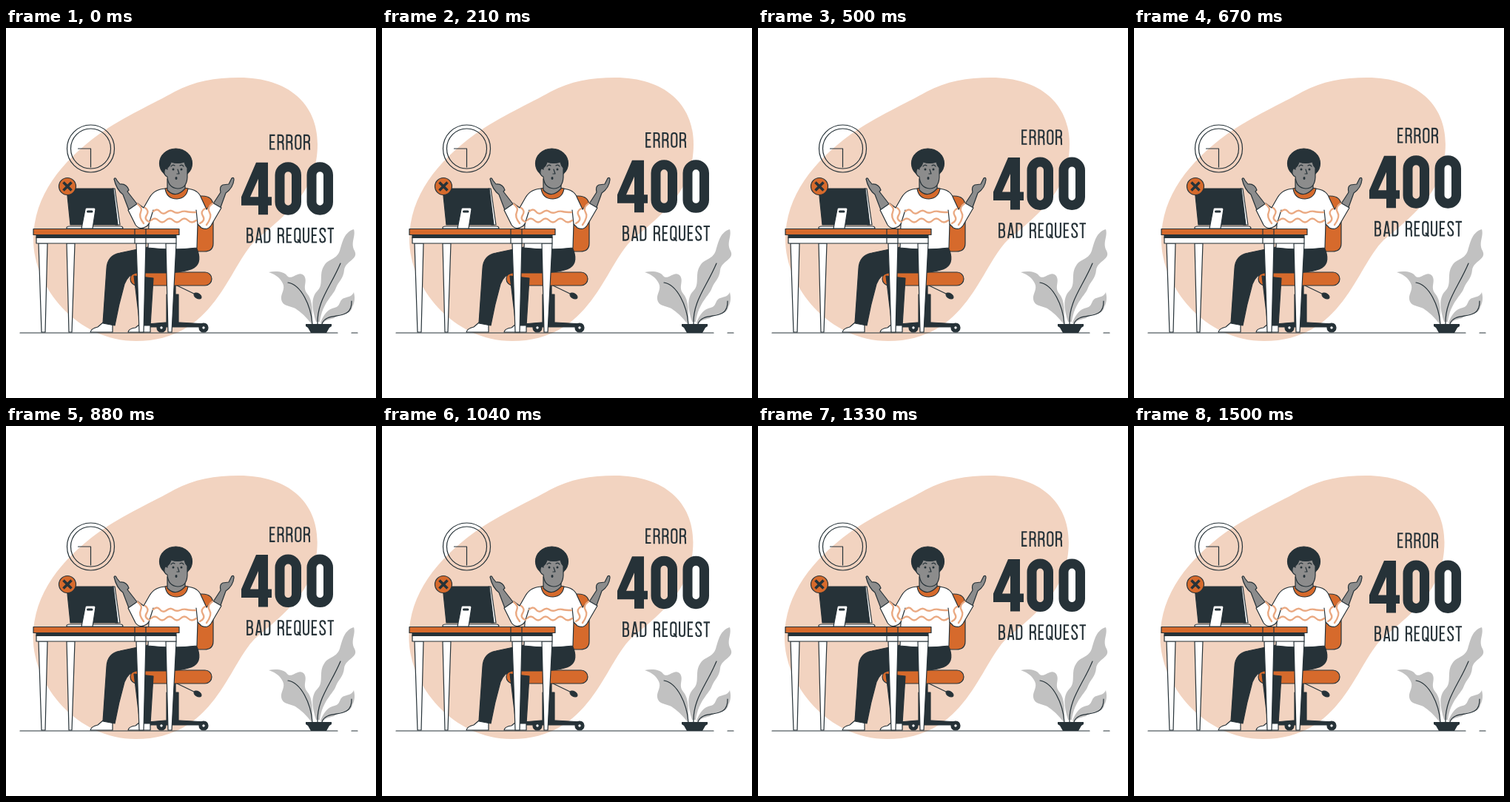
Write an HTML page that moves like this. It is 500 px wide and 500 px high and loops after 1540 ms.

```html
<!DOCTYPE html>
<html lang="en">
<head>
<meta charset="utf-8">
<title>Error 400 Bad Request</title>
<style>
  html, body { margin: 0; height: 100%; overflow: hidden; background: #fff; }
  svg { display: block; width: 100vw; height: 100vh; }
  .ink { fill: #263238; }
  .orange { fill: #d66a2c; }
  .white { fill: #fff; }
  .skin { fill: #8c8c8c; }
  .leaf { fill: #c1c1c1; }
  .line { stroke: #263238; stroke-width: 1.2; stroke-linejoin: round; stroke-linecap: round; }
  .open { fill: none; }
  .wave { fill: none; stroke: #eaa982; stroke-width: 2.4; stroke-linejoin: round; }
  .cross { fill: none; stroke-width: 3.6; stroke-linecap: butt; }
  .slot { stroke-width: 3; }
  .lettering { fill: none; stroke: #263238; stroke-width: 2.1; }
  .digits { fill: none; stroke: #263238; stroke-width: 13; }
</style>
</head>
<body>
<svg viewBox="0 0 500 500" role="img" aria-label="ERROR 400 BAD REQUEST">
  <path id="blob" fill="#f2d3c0" d="M315 67C382 67 421 103 421 157C421 218 382 250 337 287C300 324 282 423 176 423C96 423 37 350 37 286C37 226 76 180 125 144C160 119 200 102 228 86C254 72 283 67 315 67Z"/>

  <g id="clock" class="line open">
    <circle cx="114.500" cy="163" r="32"/>
    <circle cx="114.500" cy="163" r="27"/>
    <path d="M97.500 163H114.500V188"/>
  </g>

  <path class="line" d="M19 412H448M467 412H475"/>

  <g id="plant">
    <path class="leaf" d="M413 400C406 391 399 384 391 379C383 375 373 376 372 366C371 359 378 353 374 345C370 337 364 333 355 330C365 328 376 329 380 335C386 342 396 326 403 335C408 343 400 350 407 359C415 368 414 385 414 400Z"/>
    <path class="leaf" d="M419 397C413 378 412 364 421 355C430 346 422 333 430 321C435 312 447 313 451 301C455 288 457 276 470 272C473 282 465 290 471 301C477 313 459 314 457 327C456 339 449 343 446 351C443 361 428 370 424 397Z"/>
    <path class="leaf" d="M425 398C430 386 435 380 444 378C453 376 449 368 457 365C464 363 468 362 470 357C473 369 469 374 467 380C463 388 454 385 448 389C441 395 433 392 427 400Z"/>
    <path class="line open" d="M421 400C420 369 438 351 452 318M414 400C412 375 399 347 381 344M427 400C433 381 468 399 467 369"/>
    <path class="ink" d="M405 400H440V403L437 405L433 412H412L408 405L405 403Z"/>
  </g>

  <g id="chair" class="line">
    <path class="orange" d="M257 227H265Q280 227 280 241V291Q280 302 268 302H257Z"/>
    <path class="ink" d="M222 348H229V360H233V400H217V360H222Z"/>
    <path class="open" d="M229 347L256 360"/>
    <ellipse class="ink" cx="259" cy="362" rx="5.500" ry="3.200" transform="rotate(32 259 362)"/>
    <path class="ink" d="M191 400L215 398H235L270 400V404H191Z"/>
    <g class="ink"><circle cx="210" cy="405" r="6"/><circle cx="267" cy="405" r="6"/></g>
    <g class="white"><circle cx="210" cy="405" r="2.300"/><circle cx="267" cy="405" r="2.300"/></g>
    <rect class="orange" x="168" y="330" width="110" height="18" rx="9"/>
  </g>

  <g id="legs" class="line">
    <path class="white" d="M181 400L195 401V411H165Q166 406 175 405Z"/>
    <path class="ink" d="M173 335L199 338L195 402H181Z"/>
    <path class="white" d="M131 398L144 400V411H114Q115 406 124 404Z"/>
    <path class="ink" d="M192 296H257Q266 316 254 324Q242 331 207 331L176 331Q165 333 160 346Q152 374 147 402L131 399L136 325Q137 307 154 304Z"/>
  </g>

  <g id="person" class="line">
    <path class="skin" d="M166 246L158 225Q149 218 146 204Q148 201 150 206L154 211Q163 210 166 219L164 221L178 239Z"/>
    <path class="skin" d="M279 239L290 222Q288 214 293 212L301 211L305 203Q308 201 308 205Q307 216 297 223L289 245Z"/>
    <path class="white" d="M217 217Q201 217 194 229L186 243L178 237L165 246L175 266Q181 274 190 268L193 265L192 297Q225 301 258 297L259 265L264 270Q272 274 277 267L291 243L279 236L271 245L264 230Q260 218 244 217Z"/>
    <path class="open" d="M193 265L199 246M259 265L257 246"/>
    <path class="wave" d="M199 248Q204 243 208 248T217 249T226 248T235 249T244 248T256 249M196 260Q201 255 206 260T216 260T226 260T236 260T246 260T257 260"/>
    <path class="wave" d="M178 238Q185 243 182 249T186 264M188 243Q194 247 190 253T194 262M279 237Q271 243 275 249T271 266M269 244Q262 248 266 254T262 264"/>
    <path class="orange" d="M215 217Q217 231 231 231Q244 230 246 217L241 216H219Z"/>
    <ellipse class="ink" cx="229.500" cy="183" rx="22" ry="20"/>
    <path class="skin" d="M218 204V219Q229 231 242 217V205Z"/>
    <path class="skin" d="M218 189Q222 186 223 181Q232 184 241 181Q242 186 245 189V202Q244 217 232 217Q219 216 218 201Q213 199 214 193Q215 188 218 191Z"/>
    <path class="open" d="M223 187Q225 184 228 186M235 186Q238 184 240 187M232 191L234 197H231"/>
    <g class="ink" stroke="none"><circle cx="226" cy="191" r="1.500"/><circle cx="237" cy="191" r="1.500"/><ellipse cx="230" cy="203" rx="1.500" ry="2"/></g>
  </g>

  <g id="computer" class="line">
    <path class="white" d="M144 217H147L154 266H148Z"/>
    <path class="ink" d="M82 217H145L151 266H87Z"/>
    <path class="white" d="M82 270Q82 268 86 268H155Q158 268 158 271H82Z"/>
    <path class="white" d="M109 243H119Q121 243 121 245L117 271H102L107 245Q107 243 109 243Z"/>
    <path class="slot" d="M110.500 248H116"/>
    <circle class="orange" cx="83" cy="214" r="11.500"/>
    <path class="cross" d="M77.500 208.500L88.500 219.500M88.500 208.500L77.500 219.500"/>
  </g>

  <g id="desk" class="line">
    <g class="white">
      <path d="M44 291H56L53 411H48Z"/>
      <path d="M82 291H93L89 411H85Z"/>
      <path d="M216 291H230L224 411H219Z"/>
      <path d="M176 291H189L186 411H180Z"/>
      <path d="M41 283H230V291H41Z"/>
    </g>
    <rect class="ink" x="41" y="280" width="189" height="3.500"/>
    <rect class="orange" x="37" y="271.500" width="197" height="8"/>
    <path d="M174 272V291M189 272V291"/>
  </g>

  <g id="message">
    <g class="lettering" data-text="ERROR" transform="translate(356 144)"></g>
    <path class="ink" fill-rule="evenodd" d="M338 182H354V228.500H359V240H354V252.500H341V240H318V228.500ZM341 204L330 228.500H341Z"/>
    <g class="digits">
      <rect x="370" y="188" width="22.500" height="58.500" rx="11.200"/>
      <rect x="413" y="188" width="22.500" height="58.500" rx="11.200"/>
    </g>
    <g class="lettering" data-text="BAD REQUEST" transform="translate(325 270)"></g>
  </g>
</svg>
<script>
const bowl = 'M1.2 4.800Q1.200 1.200 4.700 1.200T8.200 4.800V16.200Q8.200 19.800 4.700 19.800T1.200 16.200Z';

// Condensed capitals: [advance, centre line]
const glyphs = {
  ' ': [6.5, ''],
  A: [11.3, 'M1 21L4.200 1H5.200L8.400 21M2.200 16H7.200'],
  B: [12, 'M1.200 1.200V19.800H4.500Q8 19.800 8 16.500V13.500Q8 10 4.500 10H1.200M4.500 10Q7.600 10 7.600 7V4.500Q7.600 1.200 4.500 1.200H0'],
  D: [12, 'M1.200 1.200V19.800H4.500Q8 19.800 8 16.200V4.800Q8 1.200 4.500 1.200Z'],
  E: [10.5, 'M7.500 1.200H1.200V19.800H7.500M1.200 10.300H6.700'],
  O: [11.8, bowl],
  Q: [11.8, bowl + 'M5 16L9.200 21'],
  R: [11.8, 'M1.200 21V1.200H4.500Q8 1.200 8 4.500V7Q8 10.500 4.500 10.500H1.200M4.500 10.500Q8 10.500 8 14V18Q8 20 8.500 21'],
  S: [11.3, 'M8 6V4.800Q8 1.200 4.600 1.200T1.200 4.800C1.200 10 8 11 8 16.200Q8 19.800 4.600 19.800T1.200 16.200V14.500'],
  T: [10, 'M0 1.200H8.600M4.300 1.200V21'],
  U: [11.8, 'M1.200 0V16.200Q1.200 19.800 4.600 19.800T8 16.200V0'],
};

for (const line of document.querySelectorAll('.lettering')) {
  let x = 0;
  line.innerHTML = [...line.dataset.text].map(letter => {
    const [advance, d] = glyphs[letter];
    const path = `<path d="${d}" transform="translate(${x})"/>`;
    x += advance;
    return path;
  }).join('');
}

const LOOP = 1540, FLOAT = 1500, RISE = 10;
const message = document.getElementById('message');
const blob = document.getElementById('blob');
const shift = (node, x, y) => node.setAttribute('transform', `translate(${x} ${y})`);

function draw() {
  const t = performance.now() % LOOP;
  const phase = Math.min((t + 25) / FLOAT, 1);
  shift(message, 0, -RISE * (1 - Math.abs(2 * phase - 1)));
  const drift = Math.max(0, (t - 540) / 960);
  shift(blob, -1.5 * drift ** 1.5, 0);
  requestAnimationFrame(draw);
}
draw();
</script>
</body>
</html>
```
